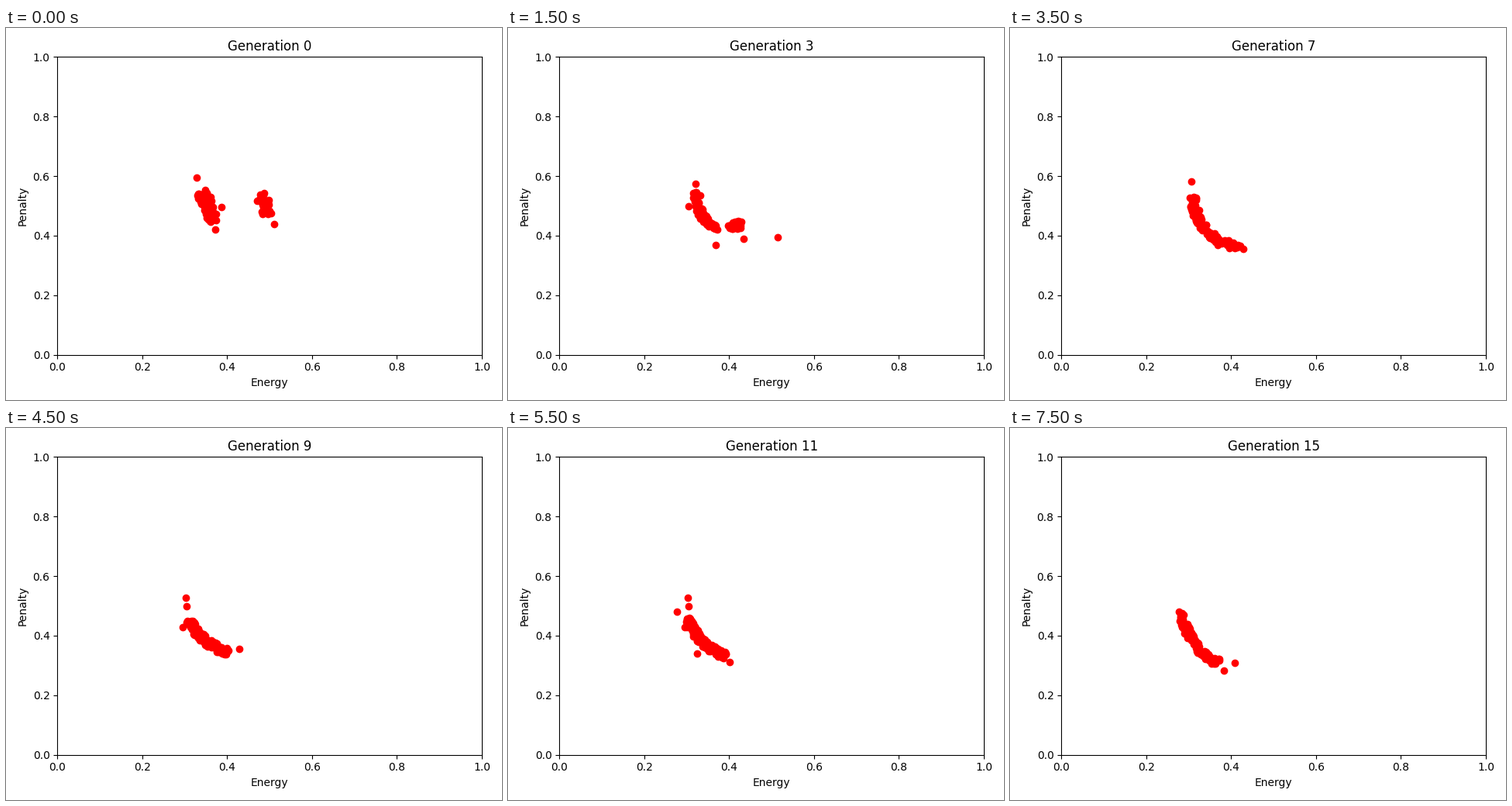
A matplotlib script that plays this animation: 640 px wide and 480 px high, repeating every 8 s.

```python
import matplotlib.pyplot as plt
import numpy as np
from matplotlib.animation import FuncAnimation

GENERATIONS = 16
STEP_MS = 500
MERGE = 4  # the two clusters form one front from here on
LEFT, BASE, WIDTH, HEIGHT = 66, 421.5, 548, 384  # plot area in pixels

# Each swarm follows a quadratic Bezier (x0, y0, x1, y1, x2, y2) that drifts
# between key generations.
LEFT_SWARM = {0: (251, 211, 263, 228, 265, 250),
              3: (243, 211, 244, 247, 269, 255)}
RIGHT_SWARM = {0: (327, 215, 335, 226, 339, 241),
               3: (283, 255, 293, 252, 301, 255)}
FRONT = {5: (240, 214, 238, 270, 301, 277),
         7: (236, 217, 238, 267, 296, 285),
         9: (235, 248, 253, 280, 287, 289),
         15: (221, 238, 231, 288, 269, 302)}

# Lone individuals: x, y, first and last generation.
LONERS = [
    (246, 193, 0, 0), (278, 231, 0, 0), (346, 253, 0, 0), (270, 260, 0, 3),
    (304, 271.5, 1, 5), (348, 270, 2, 6), (242, 201, 3, 4), (268, 280, 3, 7),
    (233, 230, 3, 11), (301, 285, 4, 9), (232, 219, 5, 11), (234, 198, 7, 7),
    (228, 257, 9, 11), (286, 302, 10, 12), (218, 237, 11, 15),
    (244, 291, 11, 11), (290, 303, 13, 15), (276, 313, 14, 15),
]


def swarm(keys, gen, count, spread, rng):
    """Points spread evenly along a drifting curve, jittered across it."""
    flat = [np.interp(gen, list(keys), col) for col in zip(*keys.values())]
    a, b, c = np.reshape(flat, (3, 1, 2))
    t = ((np.arange(count) + rng.random(count)) / count)[:, None]
    spine = (1 - t) ** 2 * a + 2 * t * (1 - t) * b + t ** 2 * c
    slope = (1 - t) * (b - a) + t * (c - b)
    normal = slope[:, ::-1] * [-1, 1]
    normal /= np.linalg.norm(normal, axis=1, keepdims=True)
    return spine + rng.uniform(-spread, spread, (count, 1)) * normal


def population(gen):
    rng = np.random.default_rng(40 + gen)
    if gen < MERGE:
        spread = 7.5 - 0.7 * gen
        groups = [swarm(LEFT_SWARM, gen, 65, spread, rng),
                  swarm(RIGHT_SWARM, gen, 25, spread, rng)]
    else:
        groups = [swarm(FRONT, gen, 90, 5, rng)]
    groups.append([(x, y) for x, y, first, last in LONERS
                   if first <= gen <= last])
    x, y = np.vstack(groups).T
    return np.column_stack([(x - LEFT) / WIDTH, (BASE - y) / HEIGHT])


fig, ax = plt.subplots(figsize=(6.4, 4.8), dpi=100)
dots = ax.scatter([], [], color="red")
ax.set(xlim=(0, 1), ylim=(0, 1), xlabel="Energy", ylabel="Penalty")
title = ax.set_title("Generation 0")
fig.tight_layout()


def update(gen):
    dots.set_offsets(population(gen))
    title.set_text(f"Generation {gen}")
    return dots, title


anim = FuncAnimation(fig, update, frames=GENERATIONS, interval=STEP_MS,
                     repeat=True, repeat_delay=0)
plt.show()
```
